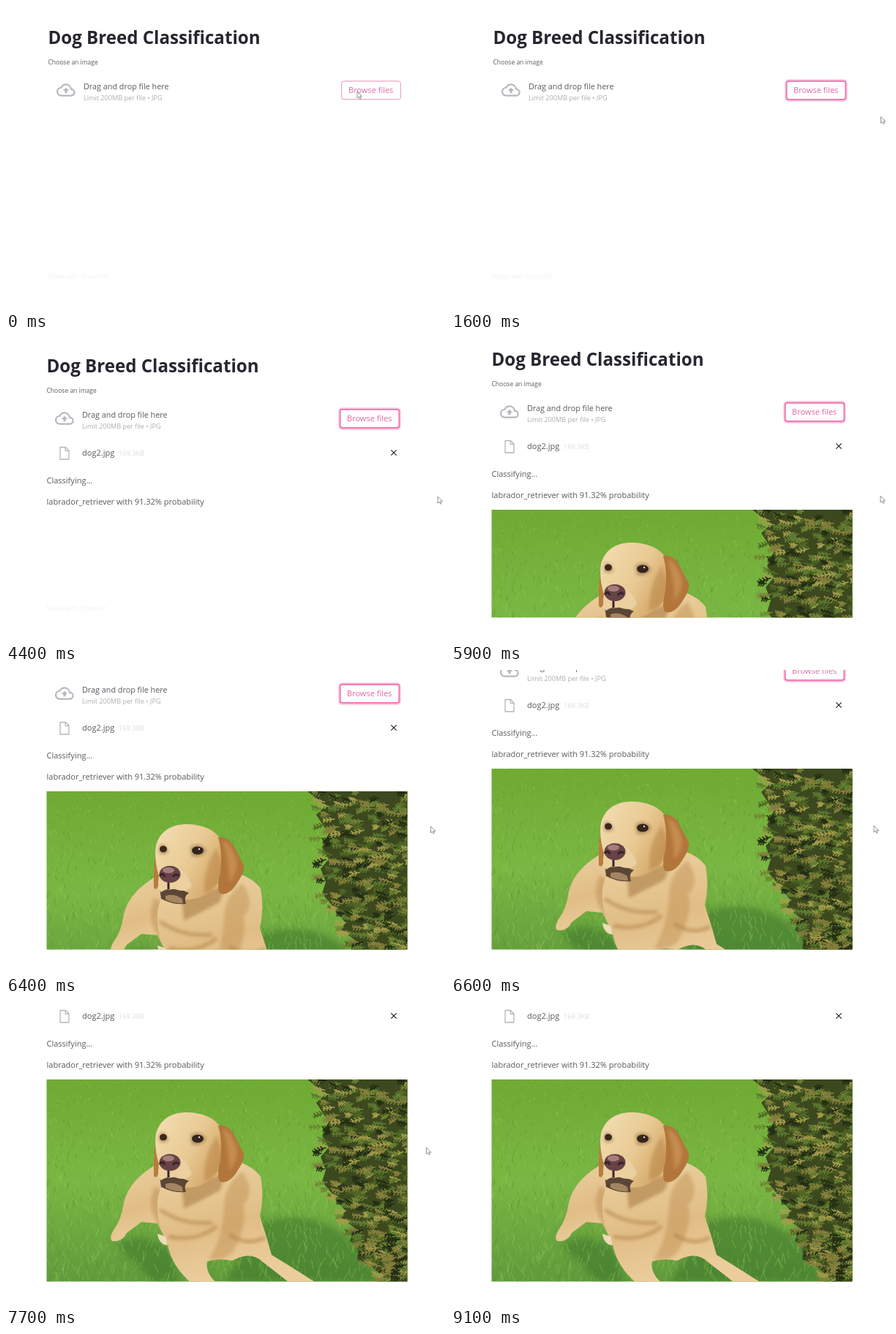
Animation of 600 by 416 pixels, one loop 9.2 s. Source, as an HTML page:

```html
<!DOCTYPE html>
<html lang="en">
<head>
<meta charset="utf-8">
<title>Dog Breed Classification</title>
<style>
  html, body { margin: 0; width: 100%; height: 100%; overflow: hidden; background: #fff; }
  svg { display: block; }
  text { font: 11px "Open Sans", "Noto Sans", sans-serif; fill: #595a61; }
  .title { font-size: 24.1px; font-weight: 700; fill: #262730; }
  .label { font-size: 8.5px; }
  .drop { font-size: 10.8px; }
  .hint { font-size: 9.1px; fill: #acadb3; }
  .size { font-size: 9.2px; fill: #dcdde1; }
  .footer { font-size: 8.7px; fill: #f1f1f3; }
  .browse { fill: #e169a1; }
  .icon { fill: none; stroke: #b4b5bc; stroke-width: 1.3; stroke-linejoin: round; }
</style>
</head>
<body>
<svg width="600" height="416" viewBox="0 0 600 416">
  <defs>
    <clipPath id="view"><rect width="600" height="382.5"/></clipPath>
    <clipPath id="frame"><rect x="55.5" y="106" width="493" height="277"/></clipPath>
    <linearGradient id="lawn" x2="0" y2="1">
      <stop offset="0" stop-color="#6fab33"/>
      <stop offset=".5" stop-color="#7ab643"/>
      <stop offset="1" stop-color="#619a3c"/>
    </linearGradient>
    <linearGradient id="fur" x2=".3" y2="1">
      <stop offset="0" stop-color="#ecd3a2"/>
      <stop offset=".6" stop-color="#e1bd86"/>
      <stop offset="1" stop-color="#ebcd9c"/>
    </linearGradient>
    <linearGradient id="face" x2="1" y2=".6">
      <stop offset="0" stop-color="#f3dfb4"/>
      <stop offset=".6" stop-color="#e8c992"/>
      <stop offset="1" stop-color="#d3a467"/>
    </linearGradient>
    <filter id="soft"><feGaussianBlur stdDeviation="5"/></filter>
    <filter id="blur"><feGaussianBlur stdDeviation="2"/></filter>
  </defs>

  <g clip-path="url(#view)">
    <g id="page">
      <text class="title" x="55.5" y="52">Dog Breed Classification</text>
      <text class="label" x="55.5" y="80.2">Choose an image</text>
      <path transform="translate(67 102) scale(1.083)" fill="#b7b8bf" d="M19.35 10.04A7.5 7.5 0 0 0 12 4C9.1 4 6.6 5.64 5.35 8.04A6 6 0 0 0 0 14c0 3.3 2.7 6 6 6h13a5 5 0 0 0 .35-9.96zM19 18H6a4 4 0 0 1-.44-7.97l1.07-.11.5-.95A5.5 5.5 0 0 1 17.39 10.43l.3 1.5 1.53.11A3 3 0 0 1 19 18zM8 13h2.55v3h2.9v-3H16l-4-4z"/>
      <text class="drop" x="104" y="113.8">Drag and drop file here</text>
      <text class="hint" x="104" y="129">Limit 200MB per file • JPG</text>
      <rect id="ring" x="456" y="102" width="82" height="27" rx="3.5" fill="none" stroke="#fac3dc" stroke-width="3.4"/>
      <rect id="button" x="456.7" y="102.8" width="80.6" height="25" rx="3" fill="#fff" stroke="#ee90bd"/>
      <text class="browse" x="466" y="119">Browse files</text>
      <g id="file">
        <path class="icon" d="M74 154.500h7.500l4.500 4.500v12h-12zM81.200 154.800v4.500h4.500"/>
        <text x="104" y="166">dog2.jpg</text>
        <text class="size" x="154" y="166">169.3KB</text>
        <path d="M526.300 158.300l7.400 7.400m0-7.400l-7.400 7.400" stroke="#222" stroke-width="1.2"/>
      </g>
      <text id="status" x="55.5" y="203.7">Classifying...</text>
      <text id="result" x="55.5" y="233">labrador_retriever with 91.32% probability</text>
      <g id="photo" transform="translate(0 143)">
        <g clip-path="url(#frame)">
          <rect x="55" y="106" width="494" height="277" fill="url(#lawn)"/>
          <path d="M350 300Q430 280 480 335L510 383H300ZM150 332Q190 310 225 340L235 383H200Z" fill="#39702a" opacity=".5" filter="url(#soft)"/>
          <g id="grass" fill="none"/>
          <path d="M412 106L437 126L424 138L441 164L432 183L441 199L430 212L437 230L432 246L447 264L464 286L458 295L476 309L470 327L482 335L480 352L502 364L522 383H549V106Z" fill="#3c481e"/>
          <g id="hedge" fill="none" stroke-width="1.6"/>
          <g id="dog">
            <path d="M207 221C181 237 164 254 160 280Q157 297 149 309Q140 322 145 327Q159 329 165 316L185 301L207 303L221 331L245 310V225Z" fill="url(#fur)"/>
            <path d="M203 252Q191 280 207 303L222 330L225 265Z" fill="#b98b50" opacity=".45" filter="url(#blur)"/>
            <path d="M216 246C203 266 203 297 220 327Q223 350 238 369L251 383H286Q272 369 275 355Q291 350 309 354Q334 340 350 355L386 383H422Q381 357 363 346Q356 320 347 293Q353 267 348 239Q335 222 311 217Z" fill="url(#fur)"/>
            <path d="M323 232Q297 251 298 283Q295 326 277 352Q304 355 313 337Q331 300 324 278Q342 260 323 232Z" fill="#b98748" opacity=".4" filter="url(#blur)"/>
            <path d="M210 284Q242 306 282 302M222 321Q260 329 288 307M305 318Q330 335 354 322" fill="none" stroke="#a9783e" stroke-width="5" opacity=".5" filter="url(#blur)"/>
            <path d="M240 246Q278 247 303 229L292 258Q264 273 243 283Z" fill="#a5743c" opacity=".55" filter="url(#blur)"/>
            <path d="M206 179Q201 207 202 238Q206 244 210 230L216 190Z" fill="#b77c3e"/>
            <path d="M205 180C211 158 230 150 250 151C277 153 293 164 297 181C302 208 297 231 278 244Q259 257 243 253Q225 263 212 248Q206 239 209 222Q202 199 205 180Z" fill="url(#face)"/>
            <path d="M288 183Q270 208 271 245Q293 238 297 208Z" fill="#b47e40" opacity=".45" filter="url(#blur)"/>
            <path d="M252 182Q267 174 274 188Q266 198 254 195ZM210 180Q217 175 222 189Q216 195 209 190Z" fill="#8e653b" opacity=".55" filter="url(#blur)"/>
            <path d="M290 169Q306 167 315 188L325 207Q327 215 317 230Q306 249 293 246Q287 241 293 217Q296 190 290 169Z" fill="#b2763b"/>
            <path d="M296 174Q309 177 316 204Q316 219 305 231Q305 200 296 174Z" fill="#d19b5b" opacity=".6" filter="url(#blur)"/>
            <path d="M210 238Q224 243 233 238L250 245Q242 250 246 260Q229 262 212 253Z" fill="#5b4636"/>
            <path d="M218 249Q229 245 241 253L242 259Q228 260 218 254Z" fill="#a38561"/>
            <path d="M210 224Q206 238 212 244Q223 237 231 240Q247 246 254 235Q248 217 234 210Z" fill="#ebd0a0"/>
            <ellipse cx="224" cy="219.500" rx="14.500" ry="11.500" fill="#674345"/>
            <ellipse cx="222" cy="214" rx="8" ry="4" fill="#a67d7b"/>
            <path d="M210 222q4-6 7 1M228 223q5-6 8-1M222 231v9" fill="none" stroke="#35252a" stroke-width="3"/>
            <ellipse cx="215" cy="185" rx="5" ry="4.500" fill="#3b281d"/>
            <ellipse cx="262" cy="187" rx="8" ry="5.500" fill="#34251d"/>
            <circle cx="264" cy="185" r="1.200" fill="#ddd"/>
            <path d="M207 317L218 321L221 333Q209 332 207 317Z" fill="#eddcb7"/>
          </g>
        </g>
      </g>
    </g>
    <text id="footer" class="footer">Made with Streamlit</text>
  </g>
  <path id="cursor" d="M0 0V9L2.200 7.200L3.700 10.300L5 9.600L3.700 6.600H6.500Z" fill="#fff" stroke="#777880" stroke-width=".8"/>
</svg>
<script>
const el = id => document.getElementById(id);
const LOOP = 9200, STEP = 100;
const scrollKeys = [[0, 0], [3300, 0], [3700, 5], [5700, 5], [5900, 14], [6200, 52], [6600, 114], [6900, 139], [7100, 143]];
const cursorX = [[0, 480], [300, 480], [1100, 586], [1300, 586], [2100, 590], [5200, 590], [5900, 587], [6600, 578], [7600, 574.5], [7900, 574.5], [8500, 585]];
const cursorY = [[0, 117], [300, 117], [1100, 112], [1300, 112], [2100, 217], [5200, 217], [5900, 216], [6600, 213], [7600, 199], [7900, 199], [8500, 204]];

let seed = 7;
const rand = (a, b) => {
  seed = (seed * 16807) % 2147483647;
  return a + (b - a) * seed / 2147483647;
};

function strokes(id, colors, count, makePath) {
  const paths = colors.map(() => "");
  for (let i = 0; i < count; i++) paths[i % colors.length] += makePath();
  el(id).innerHTML = paths.map((d, i) => `<path d="${d}" stroke="${colors[i]}"/>`).join("");
}

// Blades grow longer towards the viewer
function blade() {
  const y = rand(106, 395), len = 1.5 + (y - 100) / 24;
  return `M${rand(55, 490)} ${y}l${rand(-len, len) * .6} ${-len}`;
}

// A drooping spray with short needles on both sides
function frond() {
  const y = rand(106, 390);
  const x = rand(430 + Math.max(0, y - 240) * .6, 560);
  const len = rand(9, 20), rise = rand(-5, 6);
  let d = `M${x} ${y}l${-len} ${rise}`;
  for (let k = .25; k < 1; k += .25)
    d += `M${x - len * k} ${y + rise * k}l-4 -3m4 3l-3 4`;
  return d;
}

strokes("grass", ["#8cc44b88", "#4f8c2877", "#a5cf6a66", "#5f9c3277"], 1600, blade);
strokes("hedge", ["#6f8434", "#4f6624", "#a39c4c", "#5d7a30", "#222d13", "#857f3c"], 420, frond);

function at(keys, t) {
  const i = keys.findIndex(k => k[0] > t);
  if (i < 0) return keys[keys.length - 1][1];
  const [t0, a] = keys[i - 1], [t1, b] = keys[i];
  return a + (b - a) * (t - t0) / (t1 - t0);
}

const show = (id, on) => el(id).style.display = on ? "" : "none";
const move = (id, x, y) => el(id).setAttribute("transform", `translate(${x} ${y})`);

function draw() {
  const t = Math.floor(performance.now() % LOOP / STEP) * STEP;
  const scroll = at(scrollKeys, t);
  const overflow = t >= 3000, focused = t >= 600;
  const shift = overflow ? 0 : 2;

  move("page", shift, -scroll);
  move("footer", 55.5 + shift, (overflow ? 378 : 373) - scroll);
  move("cursor", at(cursorX, t), at(cursorY, t));

  show("file", t >= 2300);
  show("status", t >= 2600);
  show("result", overflow);
  show("photo", t >= 5700);
  show("footer", t < 5700);
  show("cursor", t < 8600);
  show("ring", focused);
  el("button").setAttribute("stroke", focused ? "#f36faf" : "#ee90bd");
  el("button").setAttribute("stroke-width", focused ? 1.7 : 1);
  requestAnimationFrame(draw);
}
draw();
</script>
</body>
</html>
```
